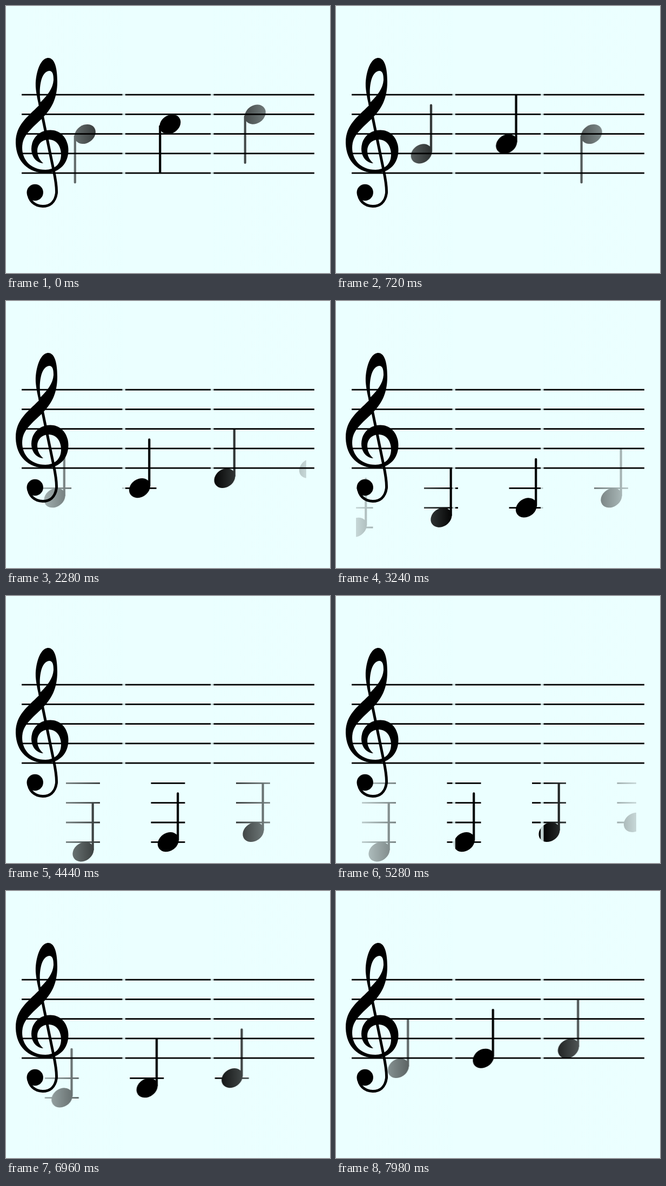
An HTML page for the animation above (8 s loop, 600x494 px).

```html
<!DOCTYPE html>
<html lang="en">
<head>
<meta charset="utf-8">
<title>Notes on a staff</title>
<style>
  html, body { margin: 0; width: 100%; height: 100%; overflow: hidden; background: #ebffff; }
  svg { display: block; width: 100%; height: 100%; }
  #notes { animation: scroll 8s -1ms infinite; }
  /* Runs down to the lowest note, then back up, one step every 60 ms */
  @keyframes scroll {
    0%     { transform: translateX(146px);    animation-timing-function: steps(23); }
    17.25% { transform: translateX(772.3px);  animation-timing-function: linear; }
    18%    { transform: translateX(772.3px);  animation-timing-function: steps(21); }
    33.75% { transform: translateX(1402px);   animation-timing-function: linear; }
    35.25% { transform: translateX(1402px);   animation-timing-function: steps(7); }
    40.5%  { transform: translateX(1612px);   animation-timing-function: steps(20); }
    55.5%  { transform: translateX(2190px);   animation-timing-function: steps(5); }
    59.25% { transform: translateX(2347.5px); animation-timing-function: linear; }
    60%    { transform: translateX(2347.5px); animation-timing-function: steps(19); }
    74.25% { transform: translateX(1823.7px); animation-timing-function: steps(8); }
    80.25% { transform: translateX(1578px);   animation-timing-function: linear; }
    81.75% { transform: translateX(1578px);   animation-timing-function: steps(7); }
    87%    { transform: translateX(1363.3px); animation-timing-function: steps(17); }
    99.75%, 100% { transform: translateX(902.5px); }
  }
</style>
</head>
<body>
<svg viewBox="0 0 600 494" preserveAspectRatio="none">
  <defs>
    <clipPath id="window"><rect x="37" y="0" width="519" height="494"/></clipPath>
    <linearGradient id="fadeL">
      <stop offset="0" stop-color="#ebffff" stop-opacity=".85"/>
      <stop offset="1" stop-color="#ebffff" stop-opacity="0"/>
    </linearGradient>
    <linearGradient id="fadeR">
      <stop offset="0" stop-color="#ebffff" stop-opacity="0"/>
      <stop offset="1" stop-color="#ebffff" stop-opacity=".85"/>
    </linearGradient>
  </defs>
  <g clip-path="url(#window)">
    <g id="notes" stroke="#000" stroke-width="4.2"></g>
  </g>
  <rect x="36" y="0" width="182" height="494" fill="url(#fadeL)"/>
  <rect x="381" y="0" width="176" height="494" fill="url(#fadeR)"/>
  <g id="staff" stroke="#000" stroke-width="2.8"></g>
  <g fill="#ebffff" fill-opacity=".82">
    <rect x="215.5" y="0" width="5.5" height="494"/>
    <rect x="379" y="0" width="5.5" height="494"/>
  </g>
  <g id="clef">
    <path fill-rule="evenodd" d="M77 96C62 98 54 128 55 150C56 163 59 176 61 184
      C40 205 18 220 18 252C18 288 42 309 73 309C100 309 115.5 290 115.5 267
      C115.5 246 102 229.5 82 229.5C60 229.5 47 247 47 264C47 279 56 290 69 291
      C61 284 58 276 58 267C58 256 67 247 79 247C94 247 102 260 102 275
      C102 292 90 303 73 303C46 303 30 285 30 262C30 240 46 228 68 207
      C84 190 95 172 95 140C95 114 90 95 77 96Z
      M64 178C61 160 62 122 80 120C87 120 88 128 88 137C87 153 76 166 64 178Z"/>
    <path fill="none" stroke="#000" stroke-width="5" d="M62.5 180L88 303
      C92 322 94 335 93.5 346C91 364 80 370.5 68 370.5C52 370 42 359 41.5 346"/>
    <circle cx="53.7" cy="345" r="15.2"/>
  </g>
</svg>
<script>
  const GAP = 157.5, STEP = 18.18, MIDDLE = 236.8;

  function add(parent, tag, attrs) {
    const el = document.createElementNS('http://www.w3.org/2000/svg', tag);
    for (const name in attrs) el.setAttribute(name, attrs[name]);
    parent.appendChild(el);
  }

  function line(parent, x1, y1, x2, y2, more) {
    add(parent, 'line', { x1, y1, x2, y2, ...more });
  }

  const staff = document.getElementById('staff');
  for (let i = -2; i <= 2; i++) {
    const y = MIDDLE - 0.2 + i * 36.25;
    line(staff, 29, y, 571, y);
  }

  // pos counts staff places below the middle line
  const notes = document.getElementById('notes');
  for (let pos = -3; pos <= 13; pos++) {
    const x = -pos * GAP, y = MIDDLE + pos * STEP;
    const dir = pos > 0 ? 1 : -1;
    for (let p = 6; p <= pos; p += 2) {
      const ly = MIDDLE + p * STEP + 0.4;
      line(notes, x - 31.5, ly, x + 31.5, ly, { 'stroke-width': 2.8 });
    }
    add(notes, 'ellipse', {
      cx: x + 0.4, cy: y + 0.2, rx: 20.8, ry: 16.6, stroke: 'none',
      transform: `rotate(-35 ${x + 0.4} ${y + 0.2})`
    });
    line(notes, x + dir * 18.2, y - dir * 4, x + dir * 18.2, y - dir * 89.5,
      { 'stroke-linecap': 'round' });
  }
</script>
</body>
</html>
```
